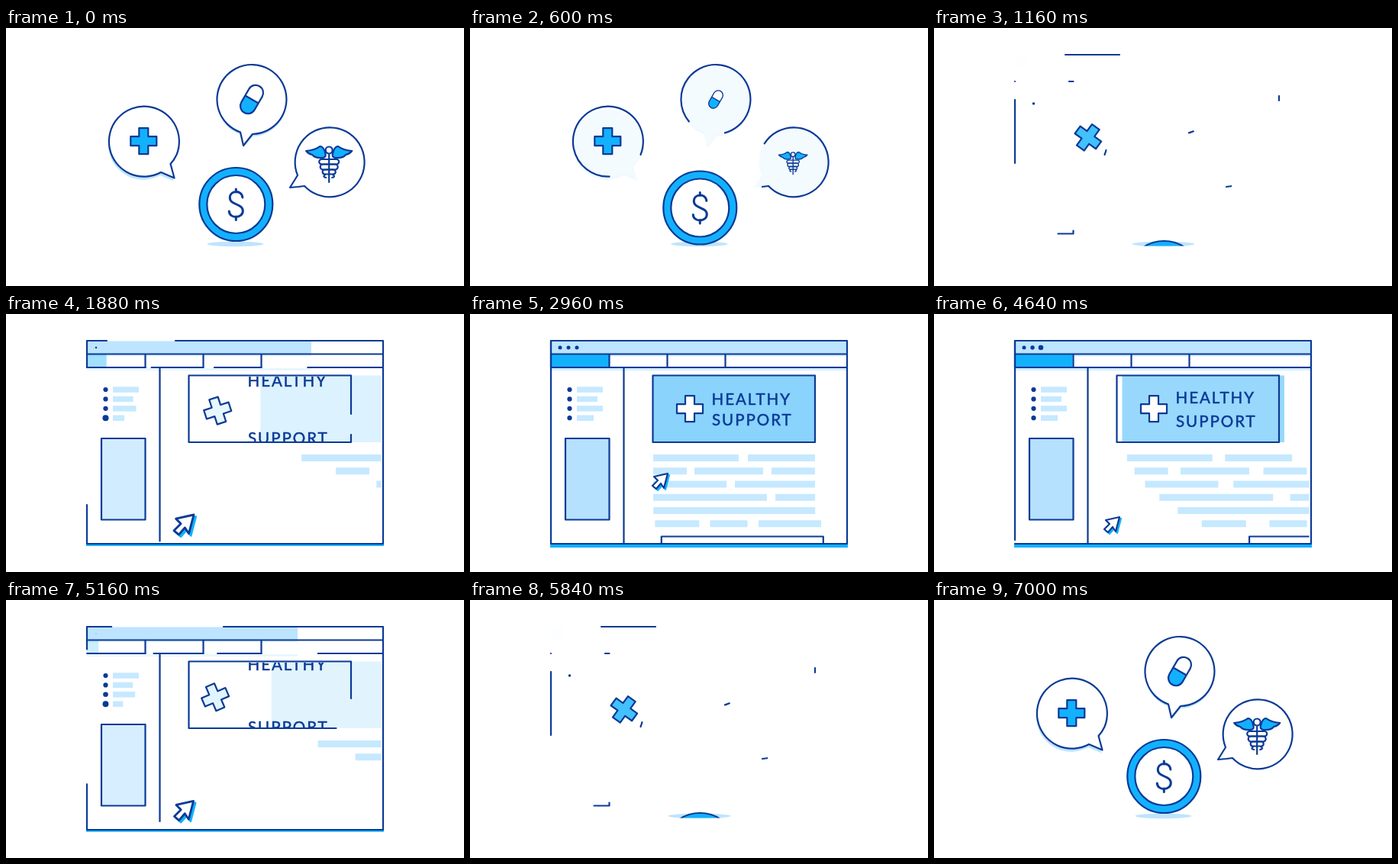
Recreate the animation shown at these times as an HTML page. Size 600x338 px, loop 7040 ms.

```html
<!DOCTYPE html>
<html lang="en">
<head>
<meta charset="utf-8">
<title>Healthy support</title>
<style>
html, body { margin: 0; width: 100%; height: 100%; overflow: hidden; background: #fff; }
svg { display: block; width: 600px; height: 338px; }
.line { fill: none; stroke: #0b3a96; stroke-width: 2.2; stroke-linecap: round; stroke-linejoin: round; }
.white { fill: #fff; }
.blue { fill: #13b1fd; }
.ink { fill: #0b3a96; }
.pale { fill: #bde4ff; }
.bar { fill: #c6e9ff; }
text { font: 20.5px Lato, "Open Sans", sans-serif; letter-spacing: 2px; fill: #0b3a96; stroke: #0b3a96; stroke-width: .5; stroke-linejoin: round; }
</style>
</head>
<body>
<svg viewBox="0 0 600 338">
  <defs>
    <clipPath id="floor"><rect x="200" y="100" width="200" height="185.5"/></clipPath>
    <clipPath id="page"><rect x="203" y="72" width="288.5" height="229"/></clipPath>
    <clipPath id="sign"><rect x="240" y="82" width="212" height="85"/></clipPath>
  </defs>

  <g id="bubbles"></g>
  <g id="pill">
    <rect class="white" x="-10" y="-20" width="20" height="40" rx="10"/>
    <path class="blue" d="M-10 0H10V10A10 10 0 0 1-10 10Z"/>
    <path class="line" d="M-10 0H10V10A10 10 0 0 1-10 10V-10A10 10 0 0 1 10-10V0"/>
  </g>
  <g id="staff">
    <g id="wings"><path class="line blue" d="M-30-14Q-18-15-12-20Q-7-20-5-11Q-3-6-8-5Q-18-4-22-9Q-27-10-30-14Z"/></g>
    <use href="#wings" transform="scale(-1 1)"/>
    <path class="line" d="M0-9V27"/>
    <g class="line" stroke-width="2">
      <rect x="-13" y="-3" width="26" height="6.5" rx="3.2"/>
      <rect x="-11.5" y="3.5" width="23" height="7" rx="3.5"/>
      <rect x="-8.5" y="10.5" width="17" height="6" rx="3"/>
      <path d="M-5 17Q-9 20-4 21M5 17Q9 20 4 21"/>
    </g>
    <circle class="line white" cy="-15" r="4.5"/>
  </g>

  <ellipse id="shade" class="pale" cx="300.5" cy="283" rx="37" ry="3.2"/>
  <g clip-path="url(#floor)"><g id="coin">
    <circle class="line blue" r="48"/>
    <circle class="line white" r="38"/>
    <path class="line" style="stroke-width:3" d="M8.5-9C8-19-8-19-8-8.500C-8 1 9 -1 9 8.500C9 19-9 19-9 9M0-20V-16M0 16V20.500"/>
  </g></g>

  <rect id="base" fill="#13b1fb" x="105" y="301" width="390"/>
  <rect id="title" class="pale" x="106" y="35.500" height="17"/>
  <g id="under" fill="#d3edff"><rect id="under1" x="106" y="53" height="2.500"/><rect id="under2" x="106" y="71" height="3"/></g>
  <rect id="tab" fill="#13b1fb" x="106" y="53" height="17"/>
  <rect id="card" fill="#b5e1ff" x="125" y="163" width="57.500" height="106.500"/>
  <g id="side"></g>
  <g clip-path="url(#page)">
    <rect id="panel" fill="#89d3fc" y="80.500" width="212.500" height="87.500"/>
    <g id="copy"></g>
    <rect id="box" class="line white" y="291.500" width="212" height="20"/>
  </g>
  <g id="frame"></g>
  <g clip-path="url(#sign)">
    <text id="word1" x="316.500">HEALTHY</text>
    <text id="word2" x="317">SUPPORT</text>
  </g>
  <path id="plus" class="line" d="M-6-17H6V-6H17V6H6V17H-6V6H-17V-6H-6Z"/>
  <g id="cursor">
    <path d="M12-8L7 11L3 5L-3 12L-8 8L-1 1L-6-4Z" fill="#13b1fb" stroke="#13b1fb" stroke-width="2.200" stroke-linejoin="round"/>
    <path class="line white" d="M10-10L5 9L1 3L-5 10L-10 6L-3-1L-8-6Z"/>
  </g>
</svg>
<script>
const LOOP = 7040, STEP = 40, LAST = 7000;
const $ = id => document.getElementById(id);
const set = (el, attrs) => { for (const k in attrs) el.setAttribute(k, attrs[k]); };
const add = (parent, tag, attrs) => {
  const el = document.createElementNS('http://www.w3.org/2000/svg', tag);
  set(el, attrs);
  return $(parent).appendChild(el);
};

const ramp = (t, start, span) => Math.min(1, Math.max(0, (t - start) / span));
const out = (t, start, span) => 1 - (1 - ramp(t, start, span)) ** 3;
const smooth = (t, start, span) => { const u = ramp(t, start, span); return u * u * (3 - 2 * u); };
const mix = (a, b, p) => a + (b - a) * p;

// Grows past full size, then settles.
const pop = (t, start) => t < start + 240
  ? 1.3 * Math.sin(ramp(t, start, 240) * Math.PI / 2)
  : mix(1.3, 1, smooth(t, start + 240, 220));

// Linear track through [time, value] pairs.
function track(t, keys) {
  if (t <= keys[0][0]) return keys[0][1];
  for (let i = 1; i < keys.length; i++) {
    const [t0, v0] = keys[i - 1], [t1, v1] = keys[i];
    if (t < t1) return mix(v0, v1, (t - t0) / (t1 - t0));
  }
  return keys[keys.length - 1][1];
}

// Shows the part of a path between lengths a and b.
function trim(el, a, b) {
  const total = el.total ??= el.getTotalLength(), len = b - a;
  el.style.visibility = len > 0.1 ? 'visible' : 'hidden';
  el.style.strokeDasharray = len >= total - 0.1 ? 'none' : `${len} ${total - len}`;
  el.style.strokeDashoffset = -a;
}
const stroke = d => add('frame', 'path', { class: 'line', d });
const place = (id, x, y, scale = 1, turn = 0) =>
  set($(id), { transform: `translate(${x} ${y}) rotate(${turn}) scale(${scale})` });

const bubbles = [
  ['M223.5 166A46 46 0 1 0 203 189L220.500 196.500L215.500 178A46 46 0 0 0 223.500 166Z', '-1 4'],
  ['M334 137.400A45.500 45.500 0 1 0 307 136.500L311 154L323 139A45.500 45.500 0 0 0 334 137.400Z', '0 3'],
  ['M383 208L391 207A45.500 45.500 0 1 0 382 193L372 209Z', '0 0']
].map(([d, shift]) => ({
  shadow: add('bubbles', 'path', { class: 'pale', d, transform: `translate(${shift})` }),
  face: add('bubbles', 'path', { class: 'white', d }),
  edge: add('bubbles', 'path', { class: 'line', d })
}));

const dots = [118, 129, 140].map((cx, i) =>
  ({ el: add('side', 'circle', { class: 'ink', cx, cy: 44 }), r: 2.5, start: 1820 + 150 * i }));
const lists = [34, 27, 34, 22].map((w, i) => {
  const y = 99 + 12.4 * i;
  dots.push({ el: add('side', 'circle', { class: 'ink', cx: 130.5, cy: y }), r: 3.1, start: 1090 + 180 * i });
  return { el: add('side', 'rect', { class: 'bar', x: 140, y: y - 3.7, height: 7.5 }), w, start: 1160 + 160 * i };
});

// Copy lines: x, width, start time.
const copy = [
  [[240, 112, 1700], [364, 88, 1740]],
  [[240, 44, 1780], [294, 90, 1820], [395, 57, 1860]],
  [[240, 96, 1860], [347, 105, 1900]],
  [[240, 149, 1940], [400, 52, 1980]],
  [[240, 212, 2020]],
  [[241, 58, 2100], [312, 49, 2140], [374, 82, 2180]]
].flatMap((row, i) => row.map(([x, width, start]) =>
  ({ el: add('copy', 'rect', { class: 'bar', y: 184 + 17.25 * i, width, height: 9 }), x, start })));

const win = stroke('M106 35V301H494V35Z');
const crown = stroke('M106 35V301H494V35Z');
const rule = stroke('M106 52.500H494');
const divider = stroke('M201.500 71V301');
const cardEdge = stroke('M125 163H182.500V269.500H125Z');
const signEdge = stroke('M452 92V80.500H239.500V168H452Z');
const tabs = [[182.5, 106, 1140], [258.5, 182.5, 1460], [334.5, 258.5, 1540], [494, 334.5, 1660]]
  .map(([right, left, start]) => ({
    foot: stroke(`M${right} 70H${left}`),
    wall: right < 494 && stroke(`M${right} 70V53`),
    start
  }));

function drawIcons(t) {
  const gone = smooth(t, 300, 940);
  for (const { shadow, face, edge } of bubbles) {
    shadow.style.opacity = 1 - smooth(t, 250, 500);
    face.style.opacity = 1 - smooth(t, 250, 500);
    trim(edge, 0, (edge.total ??= edge.getTotalLength()) * (1 - gone));
  }
  const size = 1 - smooth(t, 350, 600);
  place('pill', 322, 93.5, size, 30);
  place('staff', 423.2, 175, size);
  place('coin', 301.3, 231 + 104 * smooth(t, 500, 795));
  set($('shade'), { rx: mix(37, 41, smooth(t, 500, 600)), opacity: 1 - smooth(t, 1180, 220) });

  const p = smooth(t, 760, 1393);
  place('plus', mix(180.3, 288, p), mix(148.2, 124.2, p), 1, 180 * p);
  $('plus').style.fill = `rgb(${mix(19, 255, p)},${mix(177, 255, p)},${mix(253, 255, p)})`;
}

function drawLines(t) {
  trim(win,
    track(t, [[1040, 45], [1160, 59], [1880, 215], [2360, 266]]),
    track(t, [[1040, 45], [1160, 142], [1440, 500], [1880, 1192], [2360, 1569], [2440, 1574]]));
  trim(crown,
    track(t, [[1040, 1171], [1160, 1171], [1880, 1282]]),
    track(t, [[1040, 1171], [1160, 1242], [1880, 1343]]));
  trim(rule, 0, 388 * smooth(t, 1300, 550));
  trim(divider, 0, 230 * smooth(t, 1250, 680));
  trim(cardEdge, 160, track(t, [[1080, 160], [1160, 184], [1840, 488]]));
  trim(signEdge,
    track(t, [[1120, -3], [1160, -3], [1880, -39]]),
    track(t, [[1120, -3], [1160, 3], [1880, 534], [1940, 575]]));
  for (const { foot, wall, start } of tabs) {
    trim(foot, 0, (foot.total ??= foot.getTotalLength()) * out(t, start, 800));
    if (wall) trim(wall, 0, 17 * out(t, start + 20, 400));
  }
}

function drawPage(t) {
  set($('base'), { height: t < 1440 ? 0 : mix(1.5, 5, smooth(t, 1440, 1000)) });
  const w = t < 1140 ? 0 : 14 + 374 * smooth(t, 1120, 1130);
  set($('title'), { width: w, opacity: 0.05 + 0.95 * ramp(t, 1160, 400) });
  set($('under1'), { width: w });
  set($('under2'), { width: w });
  set($('under'), { opacity: ramp(t, 1500, 700) });
  set($('tab'), { width: 76 * out(t, 1790, 700), opacity: ramp(t, 1790, 230) });
  set($('card'), { opacity: ramp(t, 1500, 610) });
  set($('panel'), { x: 239.5 + 186 * (1 - out(t, 1668, 1041)), opacity: ramp(t, 1630, 840) });

  for (const { el, r, start } of dots) set(el, { r: r * pop(t, start) });
  for (const { el, w, start } of lists) set(el, { width: w * out(t, start, 750) });
  for (const { el, x, start } of copy) set(el, { x: x + 260 * (1 - out(t, start, 1041)) });
  set($('box'), { x: 244.5 + 260 * (1 - out(t, 2220, 1041)) });

  const lift = 44 * (1 - out(t, 1690, 1041));
  set($('word1'), { y: 119.2 - lift });
  set($('word2'), { y: 146.2 + lift });

  const m = smooth(t, 2560, 800);
  place('cursor', mix(233, 265, m), mix(276, 162, m), pop(t, 1640));
}

function render(now) {
  const time = Math.floor(now % LOOP / STEP) * STEP;
  const t = Math.min(time, LAST - time);
  drawIcons(t);
  drawLines(t);
  drawPage(t);
}

const origin = performance.now();
function tick() {
  render(performance.now() - origin);
  requestAnimationFrame(tick);
}
tick();
</script>
</body>
</html>
```
